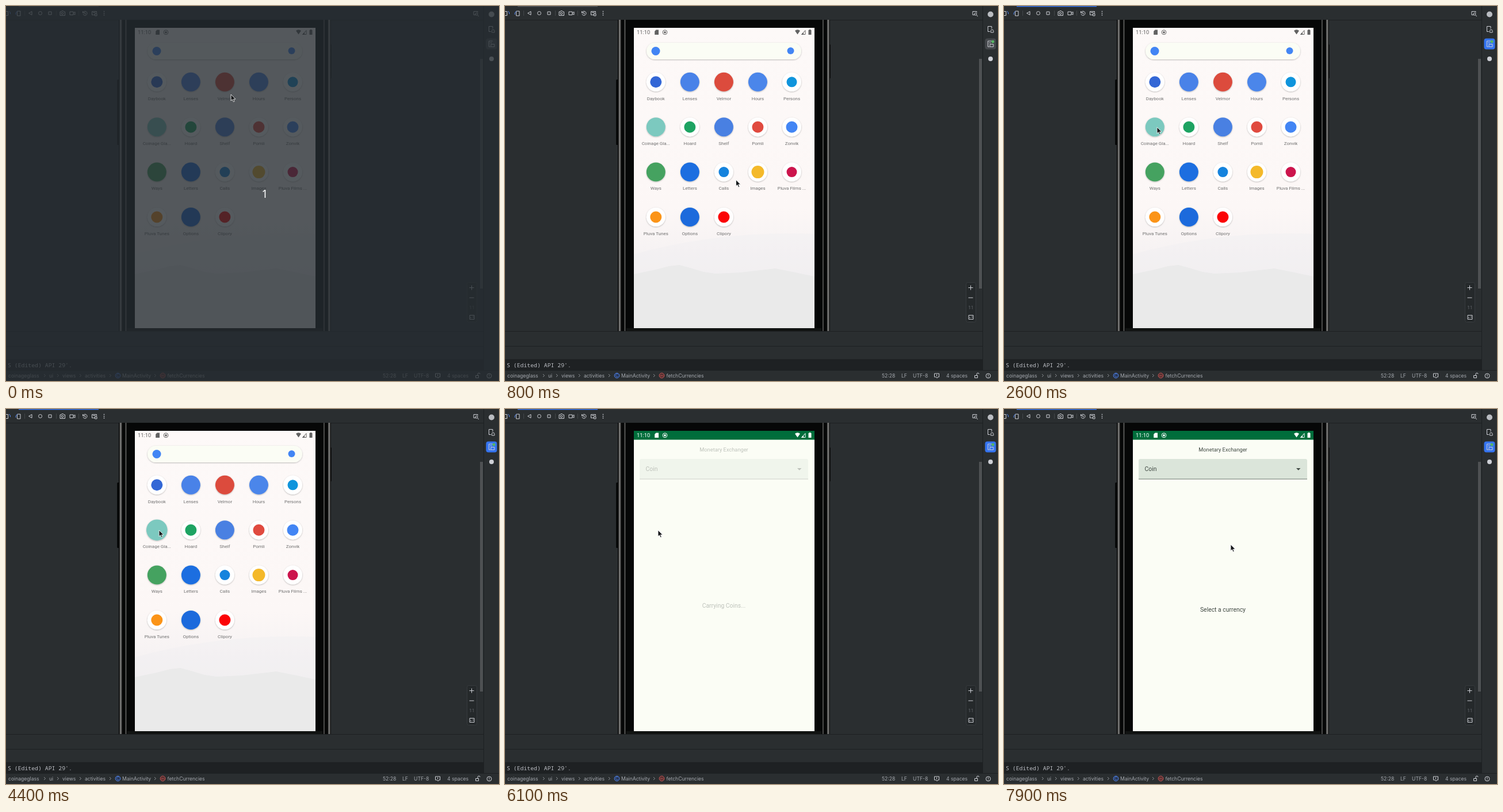
Write an HTML page that moves like this. It is 857x653 px and loops after 8000 ms.

```html
<!DOCTYPE html>
<html lang="en">
<head>
<meta charset="utf-8">
<style>
html, body { margin: 0; width: 100%; height: 100%; overflow: hidden; background: #2a2e30; }
svg { display: block; width: 857px; height: 653px; }
.ide { font: 8.6px Inter, sans-serif; fill: #a4a8ae; }
.icon { fill: none; stroke: #ced0d6; stroke-width: 1; }
.handset { font: 10.4px Roboto, sans-serif; fill: #404943; }
.label { font-size: 8px; fill: #707070; text-anchor: middle; }
.mid { text-anchor: middle; }
</style>
</head>
<body>
<svg viewBox="0 0 857 653">
  <defs>
    <linearGradient id="wall" x2="0" y2="1">
      <stop stop-color="#fdf9f8"/><stop offset=".6" stop-color="#fcf7f6"/><stop offset=".85" stop-color="#f2eff1"/>
    </linearGradient>
    <linearGradient id="rim">
      <stop stop-color="#1a1a1a"/><stop offset=".45" stop-color="#8b8b89"/><stop offset="1" stop-color="#111"/>
    </linearGradient>
    <filter id="soft"><feDropShadow dx="0" dy=".8" stdDeviation=".8" flood-opacity=".3"/></filter>
  </defs>

  <!-- Editor window -->
  <rect width="857" height="653" fill="#2a2e30"/>
  <path d="M0 24.5H830M0 566.5H830M0 592.5H830M830.5 0V634M0 634.5H857" stroke="#1d2022"/>
  <rect y="615" width="830" height="19" fill="#1e2123"/>
  <rect id="tab" x="22" width="139" height="1.4"/>
  <rect x="824" y="92" width="5" height="400" fill="#4e5153"/>
  <g class="icon">
    <path d="M0 9.5h3.5v7H0M19.5 9h5.5v8h-5.5z"/>
    <path d="M5 9q3 1 2.5 5M17 15q-1-4 3-6" stroke="#548af7"/>
    <path d="M32.5 8v9M87.5 8v9M126.5 8v9" stroke="#43474a"/>
    <path d="M45 9.5v6l-5.5-3z"/><circle cx="59.5" cy="12.5" r="3"/><path d="M74 10h5v5h-5z"/>
    <path d="M94 10h2l1-1.5h2.5l1 1.5h2v6.5H94z"/><circle cx="98" cy="13" r="1.8"/>
    <path d="M111 10h6v5.5h-6zM117 12l3-1.8v5l-3-1.8"/>
    <path d="M133.5 9v3h3M134 11.5a3.6 3.6 0 1 1 0 2.5M137 10.5v2.5l2 1"/>
    <path d="M154 15.5h-4.5v-6h8v3M151 11.5h5M154.5 13.5h3.5v3.5h-3.5z"/>
    <path d="M170.5 8.7v1.5M170.5 11.9v1.5M170.5 15.1v1.5" stroke-width="1.5"/>
    <path d="M817 15.5h-4v-6h7v2M819.5 16l2.5 2"/><circle cx="818" cy="14" r="2"/>
    <path d="M843 44.5h-3.5v-9h6.5v4M844.5 46v-2.5a2.3 2.3 0 0 1 4.6 0V46z"/>
  </g>
  <circle cx="844" cy="14.5" r="5" fill="#b9bcc1"/>
  <circle cx="844" cy="92" r="4" fill="#ced0d6"/>
  <rect id="tool" x="834.5" y="56.5" width="19" height="19" rx="4"/>
  <path class="icon" d="M846 61h-6.5v10h3M843 66.5h6v4.5h-6zM841.5 64h3"/>
  <circle id="running" cx="848" cy="62" r="2.5" fill="#57b765"/>
  <rect x="801.5" y="481.5" width="17" height="69" rx="3" fill="#25292b" stroke="#373b3e"/>
  <g class="icon">
    <path d="M805.5 490.5h8M809.5 486.5v8M805.5 508h8M806 538.5h8v7h-8zM808 543.5v-2M812 540.5v2"/>
    <path d="M746.5 640h8v6h-2l-1.5 2-1.5-2h-3zM750.5 641.5v3M816.5 643.5h5v4h-5zM820 643v-2a2 2 0 0 1 4 0"/>
    <circle cx="840" cy="644" r="4"/><path d="M840 641.5v3M840 645.5v1"/>
  </g>
  <text class="ide mid" x="809.5" y="528" fill-opacity=".5" style="font-size:7px">1:1</text>
  <text x="3" y="628.5" fill="#bcbec4" style="font:9.82px 'Noto Sans Mono', monospace">S (Edited) API 29'.</text>
  <g class="ide" id="status">
    <circle cx="194.5" cy="643.5" r="4.3" fill="#25324d" stroke="#548af7"/>
    <circle cx="272.5" cy="643.5" r="4.3" fill="#402929" stroke="#db5c5c"/>
    <text class="mid" x="194.5" y="646" style="font-size:7px;fill:#548af7">C</text>
    <text class="mid" x="272.5" y="645.8" style="font-size:7px;fill:#db5c5c">m</text>
  </g>

  <!-- Handset -->
  <rect x="193" y="128" width="5" height="114" rx="1.5" fill="#080909"/>
  <rect x="563" y="67" width="3" height="59" rx="1" fill="#111"/>
  <rect x="196" y="24" width="368.5" height="542" fill="#060707"/>
  <g fill="url(#rim)">
    <rect x="197" y="24" width="5" height="542"/><rect x="559.5" y="24" width="5" height="542"/>
    <rect x="207" y="24" width="3" height="542" opacity=".7"/><rect x="551.5" y="24" width="3" height="542" opacity=".7"/>
  </g>
  <path d="M211 561h339v5H211z" fill="#111312"/>

  <g class="handset">
    <g id="home">
      <rect x="224" y="38" width="314" height="523" fill="url(#wall)"/>
      <path d="M224 432Q380 390 538 397V561H224z" fill="#ececef" opacity=".3"/>
      <path d="M224 467L262 459 285 453 303 451 322 456 345 463 366 466 410 464 470 457 500 463 538 471V561H224z" fill="#eaeaea"/>
      <rect x="246" y="64" width="269" height="29" rx="14.5" fill="#fbfdf5" filter="url(#soft)"/>
      <circle cx="262" cy="78.5" r="7.5" fill="#4285f4"/>
      <circle cx="496.5" cy="78" r="6" fill="#4285f4"/>
    </g>
    <g id="app">
      <rect x="224" y="38" width="314" height="523" fill="#fbfdf5"/>
      <rect x="224" y="38" width="314" height="15.5" fill="#006d3b"/>
      <g id="content">
        <text class="mid" x="380.5" y="74" style="font-size:9.27px">Monetary Exchanger</text>
        <path d="M234 122V90q0-3 3-3h287q3 0 3 3v32z" fill="#dbe5da"/>
        <path d="M234 122h293" stroke="#6f7970"/>
        <text x="244.5" y="108">Coin</text>
        <path d="M508 103h7.5l-3.75 3.75z"/>
        <text id="notice" class="mid" x="380.5"></text>
      </g>
    </g>
    <g id="bar" fill="currentColor">
      <text x="229" y="49.2" style="font-size:9.4px;fill:currentColor">11:10</text>
      <path d="M262.5 41.5h4.5v8.5h-6.8v-6z"/>
      <circle cx="278" cy="45.8" r="3.9" fill="none" stroke="currentColor"/>
      <circle cx="278" cy="45.8" r="1.9"/>
      <path d="M504 43q4.5-3.5 9 0l-4.5 6.5zM527.5 42h1v-1h3v1h1v8h-5z"/>
      <path d="M515.5 49.5h6.5v-7z" fill="none" stroke="currentColor"/>
      <path d="M515 50l4-4.3V50z"/>
    </g>
  </g>

  <g id="countdown">
    <rect width="857" height="653" fill="#262c31" fill-opacity=".78"/>
    <text class="mid" x="450" y="333.5" fill="#fff" style="font:19px 'Noto Sans', sans-serif">1</text>
  </g>
  <path id="cursor" d="M0 0V11l2.5-2.3 1.8 4.1 1.9-.8-1.8-3.9H8z" fill="#16181a" stroke="#fff" stroke-width=".8"/>
</svg>
<script>
const $ = id => document.getElementById(id);

function add(parent, tag, attrs, text = '') {
  const node = document.createElementNS('http://www.w3.org/2000/svg', tag);
  for (const key in attrs) node.setAttribute(key, attrs[key]);
  node.textContent = text;
  parent.append(node);
  return node;
}

const statusItems = [[4, 'coinageglass'], [75, 'ui'], [98, 'views'], [137, 'activities'], [202, 'MainActivity'],
  [280.5, 'fetchCurrencies'], [655, '52:28'], [689, 'LF'], [709, 'UTF-8'], [767, '4 spaces']];
for (const [x, text] of statusItems) add($('status'), 'text', { x, y: 646.7 }, text);
for (const x of [66, 89, 128, 180, 258])
  add($('status'), 'path', { class: 'icon', 'stroke-opacity': 0.6, d: `M${x} 641l2.5 2.5-2.5 2.5` });

// Name, colour and, for apps on a white disc, the radius of the inner shape
const apps = [
  ['Daybook', '#3367d6', 10], ['Lenses', '#4a82e8'], ['Velmor', '#dc4b3e'], ['Hours', '#4c86ea'], ['Persons', '#0f94dc', 9],
  ['Coinage Gla...', '#7cc9bf'], ['Hoard', '#1da362', 10], ['Shelf', '#4a80e2'], ['Pomli', '#e04a3f', 10], ['Zonvik', '#4285f4', 10],
  ['Ways', '#45a260'], ['Letters', '#1a6ee0'], ['Calls', '#1583dd', 9], ['Images', '#f4b92a', 11], ['Pluva Films ...', '#cc154d', 9],
  ['Pluva Tunes', '#fb9418', 10], ['Options', '#1a6bdc'], ['Clipory', '#fb0306', 10]
];
const discs = apps.map(([name, color, inner], i) => {
  const cx = 262.3 + i % 5 * 59.05, cy = 132.3 + Math.floor(i / 5) * 78.4;
  const disc = add($('home'), 'circle', { cx, cy, r: 16.5, fill: inner ? '#fff' : color, filter: 'url(#soft)' });
  if (inner) add($('home'), 'circle', { cx, cy, r: inner, fill: color });
  add($('home'), 'text', { class: 'label', x: cx, y: cy + 31.2 }, name);
  return disc;
});

// Pointer path: time, x, y
const path = [[0, 391, 154], [100, 391, 154], [500, 400, 245], [900, 402, 322], [1100, 376, 305], [1300, 322, 262],
  [1500, 273, 227], [1800, 264, 213], [2000, 266, 211], [6400, 266, 211], [6800, 318, 282], [7100, 368, 344],
  [7300, 375, 354], [7500, 403, 330], [7600, 417, 298], [7800, 402, 250], [7900, 394, 236], [8000, 394, 236]];

function pointerAt(t) {
  const i = path.findIndex(p => p[0] > t);
  const [t0, x0, y0] = path[i - 1], [t1, x1, y1] = path[i];
  const k = (t - t0) / (t1 - t0);
  return [x0 + (x1 - x0) * k, y0 + (y1 - y0) * k];
}

const show = (id, on) => $(id).setAttribute('display', on ? 'inline' : 'none');

function draw(now) {
  const t = Math.floor(now % 8000 / 100) * 100;
  const opened = t >= 4800, focused = t >= 2600, loading = t < 6500;
  show('countdown', t < 100);
  show('running', t >= 100);
  show('home', !opened);
  show('app', opened);
  $('bar').style.color = opened ? '#fff' : '#626262';
  $('tab').setAttribute('fill', focused ? '#3574f0' : '#55585b');
  $('tool').setAttribute('fill', focused ? '#3574f0' : '#45484c');
  discs[5].setAttribute('r', t >= 4400 ? 18.3 : 16.5);
  $('content').setAttribute('opacity', t < 6100 ? 0 : t < 6200 ? 0.32 : 1);
  $('notice').textContent = loading ? 'Carrying Coins...' : 'Select a currency';
  $('notice').setAttribute('y', loading ? 345.5 : 353.3);
  $('cursor').setAttribute('transform', `translate(${pointerAt(t)})`);
  requestAnimationFrame(draw);
}
requestAnimationFrame(draw);
</script>
</body>
</html>
```
